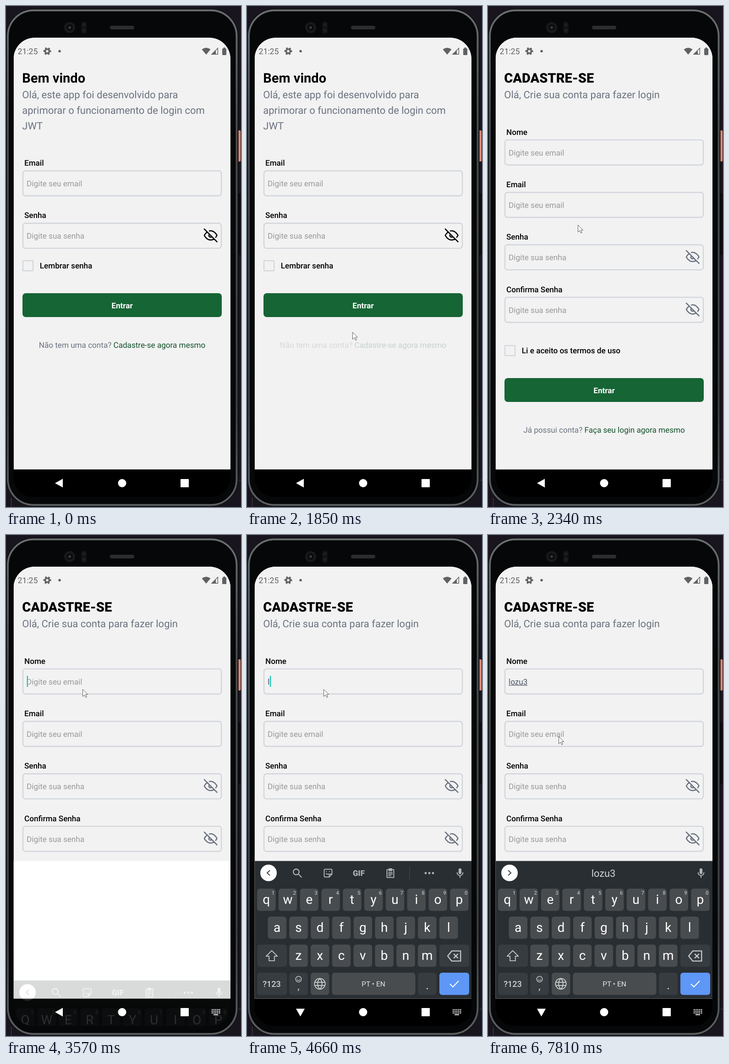
Write an HTML page with a canvas that moves like this. It is 513 by 1092 pixels and loops after 8000 ms.

```html
<!DOCTYPE html>
<html lang="pt">
<head>
<meta charset="utf-8">
<title>Cadastro</title>
<style>
html, body { margin: 0; width: 100%; height: 100%; overflow: hidden; background: #19151f; }
canvas { display: block; width: 100vw; height: 100vh; }
</style>
</head>
<body>
<canvas id="stage" width="513" height="1092"></canvas>
<script>
const view = document.getElementById('stage').getContext('2d');
const layer = new OffscreenCanvas(513, 1092).getContext('2d');
let c = view;
const LOOP = 8000, BODY = 17.12, MID = 253.5;
const LEFT = 16.5, WIDE = 473.5, TOP = 69, FOLD = 710.5, NAV = 1010.5;
const PAGE = '#f2f2f2', LINE = '#d1d5db', GRAY = '#6b7280', GREEN = '#166534', ICON = '#b1b4b6';
const USER = 'lozu3', MAIL = 'lozu2\n@zuli.test';

// Piecewise linear keyframes: [time, ...values]
function at(keys, t) {
  if (t <= keys[0][0]) return keys[0].slice(1);
  for (let i = 1; i < keys.length; i++) {
    const a = keys[i - 1], b = keys[i];
    if (t < b[0]) return a.slice(1).map((v, j) => v + (b[j + 1] - v) * (t - a[0]) / (b[0] - a[0]));
  }
  return keys[keys.length - 1].slice(1);
}

// Value of the last [time, value] step already reached
const step = (keys, t) => keys.filter(k => t >= k[0]).pop()[1];

function setFont(size, weight = 400) {
  c.font = `${weight} ${size}px Roboto, sans-serif`;
  c.textRendering = 'geometricPrecision';
}

function text(s, x, y, size, color, weight, align = 'left') {
  setFont(size, weight);
  c.textAlign = align;
  c.fillStyle = color;
  c.fillText(s, x, y);
}

function box(x, y, w, h, r, fill, stroke, lw) {
  c.beginPath();
  c.roundRect(x, y, w, h, r);
  if (fill) { c.fillStyle = fill; c.fill(); }
  if (stroke) { c.strokeStyle = stroke; c.lineWidth = lw; c.stroke(); }
}

function band(top, bottom, fill) {
  c.fillStyle = fill;
  c.fillRect(LEFT, top, WIDE, bottom - top);
}

function disc(x, y, r, fill) {
  box(x - r, y - r, 2 * r, 2 * r, r, fill);
}

// Icon drawn on a 24 unit grid centred on x, y
function icon(d, x, y, size, color, lw = 2, filled = false) {
  const p = new Path2D(d);
  c.save();
  c.translate(x - size / 2, y - size / 2);
  c.scale(size / 24, size / 24);
  c.strokeStyle = c.fillStyle = color;
  c.lineWidth = lw;
  c.lineCap = c.lineJoin = 'round';
  if (filled) c.fill(p);
  if (lw) c.stroke(p);
  c.restore();
}

function shape(d, fill, stroke, lw = 1) {
  const p = new Path2D(d);
  if (fill) { c.fillStyle = fill; c.fill(p); }
  if (stroke) { c.strokeStyle = stroke; c.lineWidth = lw; c.stroke(p); }
}

const EYE_OFF = 'M17.94 17.94A10.07 10.07 0 0 1 12 20c-7 0-11-8-11-8a18.45 18.45 0 0 1 5.06-5.94' +
  'M9.9 4.24A9.12 9.12 0 0 1 12 4c7 0 11 8 11 8a18.5 18.5 0 0 1-2.16 3.19m-6.72-1.07a3 3 0 1 1-4.24-4.24M1 1L23 23';

function phone() {
  c.fillStyle = '#19151f';
  c.fillRect(0, 0, 513, 1092);
  c.fillStyle = '#4a4850';
  c.fillRect(11, 1072, 1, 20);
  c.fillRect(507, 1033, 6, 1);
  box(505, 271, 7, 68, 2, '#e08774');
  box(505, 408, 7, 135, 2, '#0b0b0d');
  const rim = c.createLinearGradient(0, 0, 0, 1092);
  rim.addColorStop(0, '#6a6f70');
  rim.addColorStop(0.25, '#484c4e');
  rim.addColorStop(0.8, '#3c4042');
  rim.addColorStop(1, '#5c6062');
  box(0, 6, 507.5, 1085, 60, '#0d0e0f');
  box(4, 9.5, 499.5, 1078, 56, '#060708', rim, 4);
  disc(139, 47, 12, '#17191b');
  disc(139, 47, 7, '#0a0b0d');
  disc(139, 47, 3, '#353a40');
  box(164, 34, 12, 27, 5, '#101214');
  disc(170, 41, 4, '#1b1d1f');
  disc(170, 53, 4, '#1b1d1f');
  box(227, 43, 53, 8, 4, '#2c2d2e');
}

function statusBar() {
  const col = '#5f6163';
  text('21:25', 25.5, 105, 17.6, col);
  c.strokeStyle = col;
  c.lineWidth = 3.6;
  c.beginPath();
  c.arc(90, 98.5, 4.5, 0, 7);
  c.stroke();
  c.setLineDash([3.6, 3.42]);
  c.beginPath();
  c.arc(90, 98.5, 6.7, -0.27, 2 * Math.PI - 0.27);
  c.stroke();
  c.setLineDash([]);
  disc(117, 98.5, 2.7, col);
  shape('M437 106L427.5 94.5Q437 87.5 446.5 94.5Z', col);
  shape('M449 105.3H462.3V92Z', null, col, 1.4);
  shape('M449 106H458V97Z', col);
  box(472, 92.5, 9, 14.5, 1.5, col);
  c.fillRect(474.5, 90.5, 4, 3);
}

function field(label, top, hint, eye) {
  text(label, 40, top - 10, BODY, '#000', 500);
  box(37, top + 1.2, 433, 54.6, 5.5, null, LINE, 2.4);
  if (hint) text(hint, 45, top + 35, BODY, '#999');
  if (eye) icon(EYE_OFF, 446.7, top + 27.7, 30.2, eye);
}

function checkbox(top, label) {
  box(37, top + 1.2, 22, 22, 1, null, LINE, 2.2);
  text(label, 73.8, top + 18.3, BODY, '#000', 500);
}

function button(top) {
  box(36, top, 435, 52, 7, GREEN);
  text('Entrar', MID, top + 33, BODY, '#fff', 700, 'center');
}

function footer(ask, link, y) {
  setFont(BODY);
  const wa = c.measureText(ask).width, wl = c.measureText(link).width;
  const x = MID - (wa + wl) / 2;
  text(ask, x, y, BODY, GRAY);
  text(link, x + wa, y, BODY, '#14532d');
}

function heading(title, weight, lines) {
  text(title, 35.3, 167, 28.97, '#000', weight);
  lines.forEach((s, i) => text(s, 35.3, 201 + 33.8 * i, 22, GRAY));
}

function loginPage(t) {
  heading('Bem vindo', 700, ['Olá, este app foi desenvolvido para', 'aprimorar o funcionamento de login com', 'JWT']);
  field('Email', 358, 'Digite seu email');
  field('Senha', 472.3, 'Digite sua senha', '#000');
  checkbox(554, 'Lembrar senha');
  button(626);
  c.globalAlpha = at([[1500, 1], [1650, 0.2], [1920, 0.2], [2010, 1]], t)[0];
  footer('Não tem uma conta? ', 'Cadastre-se agora mesmo', 744.5);
  c.globalAlpha = 1;
}

function signupPage(t) {
  band(TOP, NAV, PAGE);
  heading('CADASTRE-SE', 900, ['Olá, Crie sua conta para fazer login']);
  const typed = step([[0, 0], [4660, 1], [5200, 2], [5540, 3], [5680, 4], [6870, 5]], t);
  field('Nome', 290.7, typed ? '' : 'Digite seu email');
  nameInput(typed, t);
  field('Email', 405, 'Digite seu email');
  field('Senha', 519.3, 'Digite sua senha', GRAY);
  field('Confirma Senha', 633.7, 'Digite sua senha', GRAY);
  checkbox(739, 'Li e aceito os termos de uso');
  button(811);
  footer('Já possui conta? ', 'Faça seu login agora mesmo', 930);
}

function nameInput(typed, t) {
  const width = n => c.measureText(USER.slice(0, n)).width;
  text(USER.slice(0, typed), 45, 325.7, BODY, '#4b5563');
  const marked = step([[0, 0], [4860, 1], [5340, 2], [5610, 3], [5940, 4], [7070, 5]], t);
  c.fillRect(45, 327, width(marked), 1.2);
  const lit = step([[0, 0], [3430, 1], [3920, 0], [4400, 1], [6410, 0], [6870, 1], [7560, 0]], t);
  c.fillStyle = '#10cbba';
  if (lit) c.fillRect(45.6 + width(typed), 307, 2.4, 24);
}

function zoomed(scale, alpha, draw) {
  c.save();
  c.globalAlpha = alpha;
  c.translate(MID, 540);
  c.scale(scale, scale);
  c.translate(-MID, -540);
  draw();
  c.restore();
}

function pages(t) {
  band(TOP, NAV, PAGE);
  const p = Math.min(1, Math.max(0, (t - 1920) / 400)), ease = 1 - (1 - p) ** 4;
  if (p < 1) zoomed(1 + 0.15 * ease, 1, () => loginPage(t));
  if (p > 0) zoomed(0.85 + 0.15 * ease, Math.min(1, Math.max(0, (t - 1970) / 83)), () => signupPage(t));
}

function key(x, y, w, fill = '#484c4f') {
  box(x, y, w, 48.5, 6, fill);
}

function letters(row, x0, y, upper, hints) {
  [...row].forEach((ch, i) => {
    const x = x0 + 46.8 * i;
    key(x, y, 40.5);
    text(upper ? ch.toUpperCase() : ch, x + 20.2, y + (upper ? 35 : 33), 28, '#fff', 400, 'center');
    if (hints) text((i + 1) % 10, x + 35, y + 13, 11.5, '#b4b7b9', 500, 'center');
  });
}

function toolbar(t) {
  disc(47, 736.5, 18, '#fff');
  c.save();
  c.translate(47, 736.5);
  c.rotate(Math.PI * at([[4860, 0], [5010, 1]], t)[0]);
  shape('M3 -5.5L-3 0L3 5.5', null, '#3c4043', 2);
  c.restore();
  icon('M12 14a3 3 0 0 0 3-3V5a3 3 0 0 0-6 0v6a3 3 0 0 0 3 3z', 465, 737, 25, ICON, 0, true);
  icon('M6 11a6 6 0 0 0 12 0M12 17v4', 465, 737, 25, ICON);
  if (t < 4930) {
    icon('M9.5 3.5a6 6 0 1 0 .01 0M14 14L20.5 20.5', 110, 737, 25, ICON);
    icon('M5 3.5h14l1.5 1.5v9l-6 6.5H5L3.5 19V5zM14.5 20v-6h6M8.5 8.5v.1M15 8.5v.1M8 13q2 2.5 4.5 1', 177, 737, 24, ICON);
    text('GIF', 244, 743, 17, ICON, 900, 'center');
    icon('M4.5 4.5h15v17h-15zM9 2.5h6v4H9zM8 10.5h8M8 14h8M8 17.5h5', 313, 737, 24, ICON);
    c.fillStyle = '#484d51';
    c.fillRect(354.5, 723, 1, 28);
    for (let i = -1; i < 2; i++) disc(398 + 8 * i, 737, 2.4, ICON);
    return;
  }
  const words = step([
    [0, ['l', 'la', 'logo']],
    [5340, ['lo', 'lozu', USER]],
    [5610, ['loz', MAIL, USER]],
    [5940, [MAIL, 'lozu', USER]],
    [7070, ['', USER, '']]
  ], t);
  words.forEach((s, i) => {
    const x = 123 + 129 * i, [a, b] = s.split('\n');
    if (b) {
      text(a, x, 728, 17.2, '#e4e6e7', 500, 'center');
      text(b, x, 748, 15.5, '#d3d5d6', 400, 'center');
    } else text(a, x, 745, 21.8, '#d3d5d6', 400, 'center');
  });
  c.fillStyle = '#454a4e';
  if (words[0]) for (const x of [183.5, 320.5]) c.fillRect(x, 723, 1, 29);
}

function keyboard(t) {
  const upper = t < 4660, dark = '#373c40', pale = '#d2d4d5';
  band(FOLD, NAV, '#292e32');
  toolbar(t);
  letters('qwertyuiop', 22, 770.7, upper, true);
  letters('asdfghjkl', 45.5, 831.7, upper);
  letters('zxcvbnm', 92.2, 892.7, upper);
  key(22, 892.7, 65, dark);
  icon('M12 2.5L22.5 13H17V21.5H7V13H1.5z', 54, 917, 28, '#c6c8ca', 1.6, upper);
  key(420, 892.7, 65, dark);
  icon('M8 4h14v16H8L1.5 12zM11.5 9l6 6M17.5 9l-6 6', 452.5, 917.7, 33, '#c6c8ca', 1.7);
  key(22, 954, 65, dark);
  text('?123', 54, 985, 18, pale, 500, 'center');
  key(92.2, 954, 40.5, dark);
  icon('M12 2a10 10 0 1 0 .01 0M8.5 9v.1M15.5 9v.1M7 14q5 5.5 10 0', 112.5, 968, 15, pale, 2);
  text(',', 112.5, 991, 22, pale, 400, 'center');
  key(139, 954, 40.5);
  icon('M12 2a10 10 0 1 0 .01 0M2.5 9h19M2.5 15h19M12 2c-5.5 5-5.5 15 0 20c5.5-5 5.5-15 0-20', 159, 978.3, 28, pale, 1.5);
  key(185.5, 954, 182);
  text('PT • EN', 276, 984, 15.5, '#e6e7e8', 400, 'center');
  key(373, 954, 40.5, dark);
  text('.', 393.5, 990, 22, pale, 500, 'center');
  key(420, 954, 65, '#5e97f6');
  shape('M443 978.5L449.5 985L462 972', null, '#fff', 2);
}

// The keyboard fades as one layer, so its parts must not show through each other
function slideKeyboard(t) {
  const [dy, alpha] = at([[3500, 300, 0], [3570, 263, 0.168], [3640, 80, 0.7], [3710, 13, 1], [3850, 0, 1]], t);
  c = layer;
  c.clearRect(0, 0, 513, 1092);
  keyboard(t);
  c = view;
  c.globalAlpha = alpha;
  c.drawImage(layer.canvas, 0, dy);
  c.globalAlpha = 1;
}

function navBar(t) {
  c.save();
  c.translate(116.5, 1040);
  c.rotate(at([[3600, 0], [3710, -0.38], [3920, -Math.PI / 2]], t)[0]);
  shape('M-9.5 0L7.5 -9.5V9.5Z', '#fff');
  c.restore();
  disc(MID, 1040, 9, '#fff');
  box(381, 1031, 18, 18, 1, '#fff');
  if (t < 3500) return;
  for (let i = 0; i < 15; i++) c.fillRect(449 + 4 * (i % 5), 1033.5 + 3.6 * Math.floor(i / 5), 2.4, 2.2);
  c.fillRect(453, 1044.5, 10, 2);
}

function pointer(t) {
  if (t < 130) return;
  const [x, y] = at([
    [130, 476, 1078], [890, 314, 818], [1560, 231, 718], [1780, 231, 718], [1850, 230, 711],
    [2340, 196, 477], [2600, 183, 451], [3300, 167, 336], [7460, 167, 336], [7810, 154, 439]
  ], t);
  c.save();
  c.translate(x + 0.5, y + 0.5);
  shape('M0 0V15.5L3.8 12L6.4 17.6L8.8 16.5L6.3 11H11Z', '#fff', '#484848', 0.9);
  c.restore();
}

function draw(t) {
  phone();
  c.save();
  c.beginPath();
  c.roundRect(LEFT, TOP, WIDE, 1001, [46, 46, 42, 42]);
  c.clip();
  c.save();
  c.beginPath();
  c.rect(LEFT, TOP, WIDE, NAV - TOP);
  c.clip();
  pages(t);
  statusBar();
  c.restore();
  band(NAV, 1071, '#000');
  if (t >= 3500) {
    band(FOLD, NAV, '#fff');
    slideKeyboard(t);
  }
  navBar(t);
  c.restore();
  pointer(t);
}

function tick(now) {
  draw(now % LOOP);
  requestAnimationFrame(tick);
}
requestAnimationFrame(tick);
</script>
</body>
</html>
```
